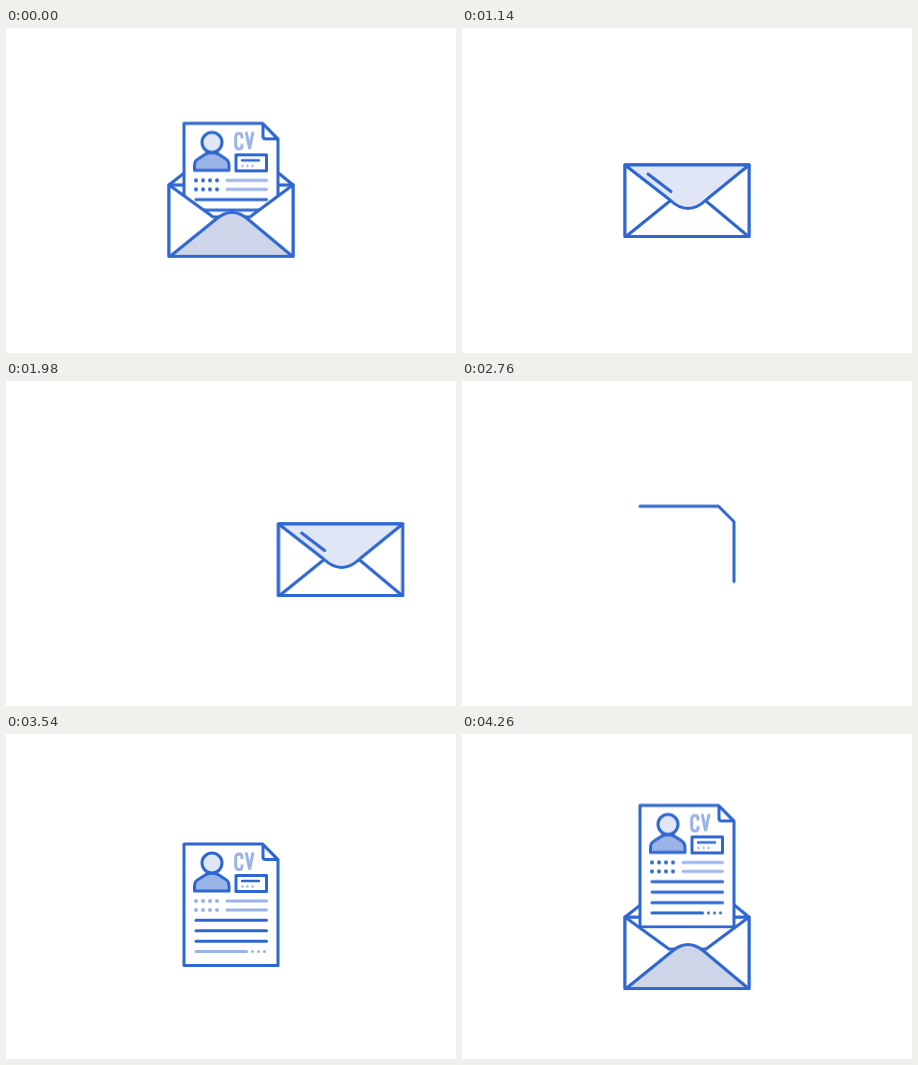
Write an HTML page that moves like this. It is 450x325 px and loops after 4.32 s.

```html
<!DOCTYPE html>
<html lang="en">
<head>
<meta charset="utf-8">
<title>CV by mail</title>
<style>
  html, body { margin: 0; width: 100%; height: 100%; overflow: hidden; background: #fff; }
  svg { display: block; width: 100%; height: 100%; }
  svg {
    --dark: #2f67d1; --light: #9bb4e8; --pale: #e0e6f6; --shade: #cfd5e8;
    fill: none; stroke: var(--dark); stroke-width: 3;
    stroke-linecap: round; stroke-linejoin: round;
  }
  svg * { animation: 4.32s linear infinite; }
  .white { fill: #fff; }
  .light { stroke: var(--light); }
  .dots { stroke: none; fill: currentColor; }
  .pale-dots { stroke: none; fill: var(--light); }

  /* envelope */
  .swing { transform-origin: 225px 150.5px; animation-name: swing; }
  .env { transform-origin: 225px 150.5px; animation-name: env; }
  .env * { vector-effect: non-scaling-stroke; }
  .flap { transform: scaleY(-1); transform-origin: 225px 137px; animation-name: flap; }
  .cover { animation-name: cover; }
  .bottom { fill: var(--shade); animation-name: bottom; }
  .wind path {
    stroke: var(--light); stroke-linecap: butt; stroke-width: 2;
    stroke-dasharray: 40 300; stroke-dashoffset: 41; animation-name: wind;
  }

  /* document */
  .doc { animation-name: doc; }
  .sheet { stroke-dasharray: 422 900; animation-name: sheet; }
  .tint { color: var(--dark); animation-name: tint; }
  .draw { stroke-dasharray: 1 2; animation-name: draw; animation-delay: calc(var(--i, 0) * 40ms); }
  .pop {
    transform-box: fill-box; transform-origin: center;
    animation-name: pop; animation-delay: calc(var(--i, 0) * 40ms);
  }

  @keyframes swing {
    0%, 6.944% { transform: rotate(0deg); animation-timing-function: ease-in; }
    11.111% { transform: rotate(25deg); animation-timing-function: ease-out; }
    13.194% { transform: rotate(38deg); animation-timing-function: ease-in-out; }
    17.361% { transform: rotate(-38deg); animation-timing-function: ease-in-out; }
    20.833%, 100% { transform: rotate(0deg); }
  }
  @keyframes env {
    0% { transform: translate(0, 19.5px) scale(1); opacity: 1; animation-timing-function: ease-out; }
    2.778% { transform: translate(0, 43px) scale(1); animation-timing-function: ease-in-out; }
    6.944%, 26.389% { transform: translate(0, 0) scale(1); animation-timing-function: ease-in-out; }
    30.556% { transform: translate(0, -6.5px) scale(1); animation-timing-function: ease-in; }
    36.111% { transform: translate(-30px, 6px) scale(1); animation-timing-function: ease-out; }
    39.6% { transform: translate(-58px, 6px) scale(1); animation-timing-function: ease-in; }
    49.5% { transform: translate(300px, 6px) scale(1); opacity: 1; }
    49.51%, 88.88% { transform: translate(0, 13px) scale(0); opacity: 0; }
    88.889% { transform: translate(0, 13px) scale(0); opacity: 1; animation-timing-function: ease-out; }
    94.444% { transform: translate(0, 13px) scale(1.24); animation-timing-function: ease-in-out; }
    98.611% { transform: translate(0, 46.5px) scale(1); }
    100% { transform: translate(0, 19.5px) scale(1); opacity: 1; }
  }
  @keyframes flap {
    0%, 19% { transform: scaleY(-1); animation-timing-function: ease-out; }
    21.3% { transform: scaleY(-1.65); }
    25%, 50% { transform: scaleY(1); }
    50.01%, 100% { transform: scaleY(-1); }
  }
  @keyframes cover {
    0%, 23.6% { opacity: 0; }
    23.61%, 50% { opacity: 1; }
    50.01%, 100% { opacity: 0; }
  }
  @keyframes bottom {
    0%, 22% { fill: var(--shade); }
    25%, 50% { fill: #fff; }
    50.01%, 100% { fill: var(--shade); }
  }
  @keyframes wind {
    0%, 30.5% { stroke-dashoffset: 41; }
    36.111% { stroke-dashoffset: -91; }
    36.9%, 100% { stroke-dashoffset: -101; }
  }
  @keyframes doc {
    0% { transform: translateY(-15px); opacity: 1; animation-timing-function: ease-out; }
    2.778% { transform: translateY(8.5px); animation-timing-function: ease-in-out; }
    6.944% { transform: translateY(-22px); }
    11.111% { transform: translateY(-9.5px); }
    16.667% { transform: translateY(12px); }
    21% { transform: translateY(30px); }
    24.9% { transform: translateY(30px); opacity: 1; }
    25%, 58.32% { transform: translateY(0); opacity: 0; }
    58.333% { transform: translateY(0); opacity: 1; animation-timing-function: ease-in; }
    63.889% { transform: translateY(15px); animation-timing-function: ease-out; }
    66.667% { transform: translateY(32px); animation-timing-function: ease-in-out; }
    69.444% { transform: translateY(3.5px); animation-timing-function: ease-out; }
    73.611% { transform: translateY(-8.5px); animation-timing-function: ease-in-out; }
    77.778% { transform: translateY(3.5px); animation-timing-function: ease-in-out; }
    81.944%, 83.333% { transform: translateY(0); animation-timing-function: ease-in-out; }
    86.111% { transform: translateY(5px); animation-timing-function: ease-in-out; }
    91.667% { transform: translateY(-68.5px); animation-timing-function: ease-in; }
    94.444% { transform: translateY(-53.5px); }
    98.611% { transform: translateY(-39px); }
    100% { transform: translateY(-15px); opacity: 1; }
  }
  @keyframes sheet {
    0%, 50% { stroke-dashoffset: 0; }
    50.01%, 58.333% { stroke-dashoffset: 422; animation-timing-function: ease-in; }
    63.889% { stroke-dashoffset: 264; }
    66.667%, 100% { stroke-dashoffset: 0; }
  }
  @keyframes tint {
    0%, 50% { color: var(--dark); }
    50.01%, 86% { color: var(--light); }
    94.444%, 100% { color: var(--dark); }
  }
  @keyframes draw {
    0%, 50% { stroke-dashoffset: 0; }
    50.01%, 70% { stroke-dashoffset: 1.1; animation-timing-function: ease-out; }
    76%, 100% { stroke-dashoffset: 0; }
  }
  @keyframes pop {
    0%, 50% { transform: scale(1); }
    50.01%, 68% { transform: scale(0); animation-timing-function: ease-out; }
    73% { transform: scale(1.1); animation-timing-function: ease-in-out; }
    76%, 100% { transform: scale(1); }
  }
</style>
</head>
<body>
<svg viewBox="0 0 450 325">
  <g class="wind">
    <path pathLength="100" d="M128 163H91"/>
    <path pathLength="100" d="M128 179H81" style="stroke-width:3"/>
    <path pathLength="100" d="M128 195H91"/>
  </g>

  <g class="swing">
    <g class="env">
      <path class="white" d="M163 137H287V208.5H163Z"/>
      <path class="white flap" d="M163 137L208 172Q217 180.5 226 180.5T244 172L287 137Z"/>
    </g>

    <g class="doc">
      <path class="white sheet" d="M178 110H256.5L272 125.5V231.5H178Z"/>
      <path class="white pop" d="M257 110.5V123Q257 125.5 259.5 125.5H271.5Z"/>

      <g class="pop">
        <path fill="#9bb4e8" d="M188.5 157V152Q188.5 147 193 145L200 140.5Q206 138 212 140.5L219 145Q223 147 223 152V157Z"/>
        <circle cx="206" cy="129" r="10" fill="#e0e6f6"/>
      </g>
      <g class="pop" style="--i:1">
        <path class="light" role="img" aria-label="CV" stroke-linecap="butt" stroke-linejoin="miter"
          d="M236 125V123.5Q236 120 233 120T229.7 123.5V132Q229.7 135.6 233 135.6T236 132V130.5M240.2 118.5L243.6 135.5L247 118.5"/>
      </g>
      <g class="pop" style="--i:2">
        <path class="white" d="M230 141.5H260.5V157.5H230Z"/>
        <path stroke-width="2.4" d="M236 147H253"/>
        <g class="pale-dots">
          <circle cx="236.5" cy="152.5" r="1.2"/><circle cx="241.5" cy="152.5" r="1.2"/><circle cx="246.5" cy="152.5" r="1.2"/>
        </g>
      </g>

      <g class="tint">
        <g class="dots">
          <g class="pop" style="--i:2">
            <circle cx="190" cy="167" r="2"/><circle cx="197" cy="167" r="2"/><circle cx="204" cy="167" r="2"/><circle cx="211" cy="167" r="2"/>
            <circle cx="190" cy="176" r="2"/><circle cx="197" cy="176" r="2"/><circle cx="204" cy="176" r="2"/><circle cx="211" cy="176" r="2"/>
          </g>
          <g class="pop" style="--i:5">
            <circle cx="246.5" cy="217.5" r="1.5"/><circle cx="252.5" cy="217.5" r="1.5"/><circle cx="258.5" cy="217.5" r="1.5"/>
          </g>
        </g>
        <path class="draw" style="--i:5" stroke="currentColor" pathLength="1" d="M190 217.5H240.5"/>
      </g>
      <path class="draw light" style="--i:1" pathLength="1" d="M221 167H260.5"/>
      <path class="draw light" style="--i:1" pathLength="1" d="M221 176H260.5"/>
      <path class="draw" style="--i:2" pathLength="1" d="M190 186.3H260.5"/>
      <path class="draw" style="--i:3" pathLength="1" d="M190 196.7H260.5"/>
      <path class="draw" style="--i:4" pathLength="1" d="M190 207.2H260.5"/>
    </g>

    <g class="env">
      <!-- hides the sheet below the envelope -->
      <path class="white" stroke="none" d="M163 200H287V268H163Z"/>
      <path class="white" d="M163 137L207 169H244L287 137V208.5H163Z"/>
      <path class="bottom" d="M164 208.5L211 170.5Q226 158.5 241 170.5L286.5 208.5Z"/>
      <g class="cover">
        <g class="flap">
          <path fill="#e0e6f6" d="M163 137L208 172Q217 180.5 226 180.5T244 172L287 137Z"/>
          <path d="M186 146L209 163.5"/>
        </g>
      </g>
    </g>
  </g>
</svg>
</body>
</html>
```
